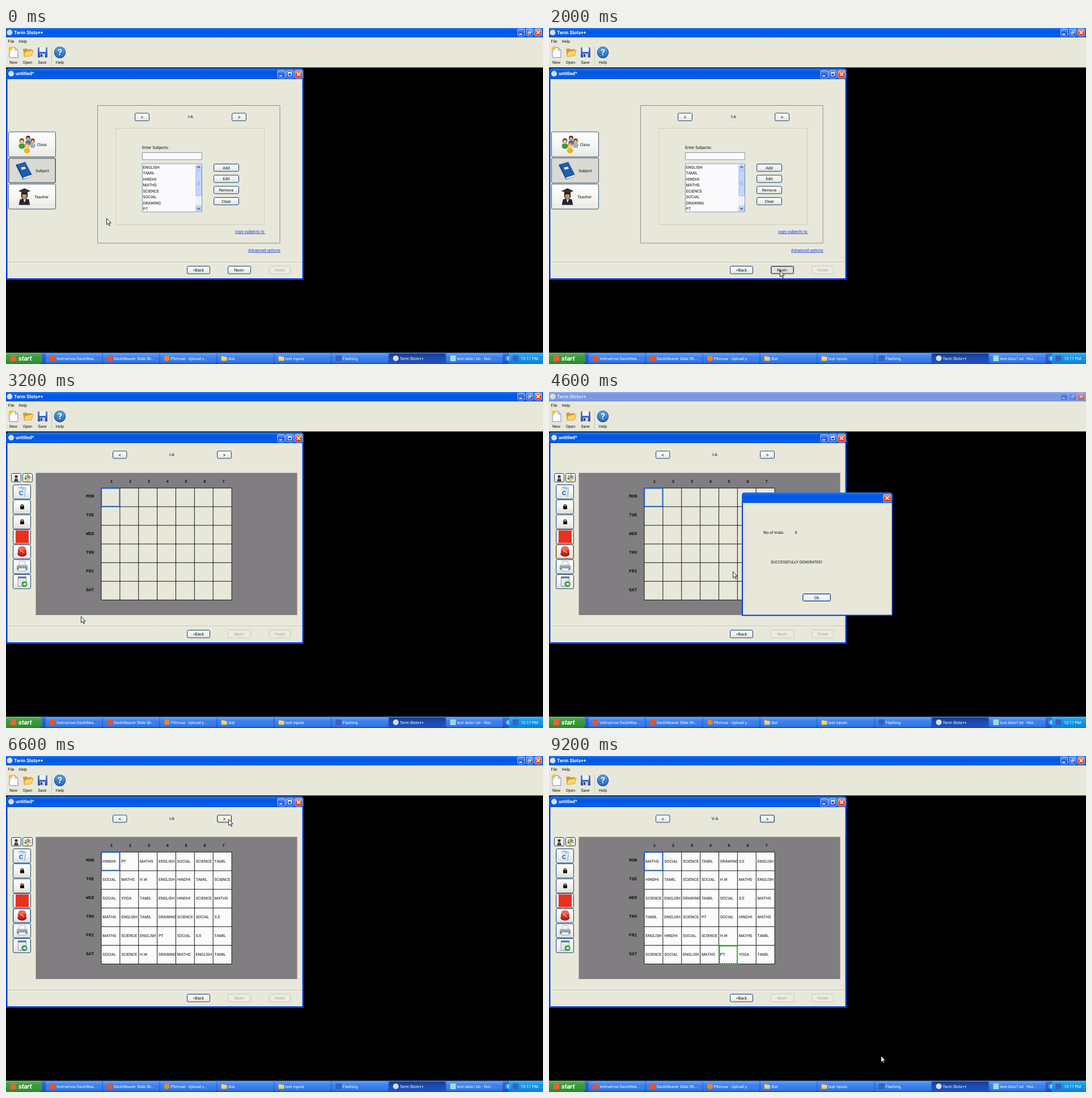
Animation, 947 px wide and 592 px high, one loop 9300 ms. Source, as an HTML page with a canvas:

```html
<!DOCTYPE html>
<html lang="en">
<head>
<meta charset="utf-8">
<title>Term Slots++</title>
<style>
html, body { margin: 0; width: 100%; height: 100%; overflow: hidden; background: #000; }
canvas { display: block; width: 947px; height: 592px; }
</style>
</head>
<body>
<canvas id="stage" width="947" height="592"></canvas>
<script>
const c = document.getElementById('stage').getContext('2d');
const LOOP = 9300, STEP = 100;
const BODY = '#e8e8da', SANS = 'Roboto, sans-serif', MONO = '"Liberation Mono", monospace';
const BLUE = ['#2a7cf2', '#0a5fe8', '#0055e2', '#0058ea', '#025ff2', '#0448c0'];
const DULL = ['#93b0ec', '#7c9ae4', '#7896e2', '#7a98e4', '#7e9ce8', '#6c88d4'];

// moments of the hard changes
const AT = { press: 1700, grid: 2400, dialog: 4200, filled: 5300, click: 6700, mark: 8500 };

const path = [
  [0, 177, 335], [300, 177, 335], [1500, 407, 427], [2500, 407, 427], [3200, 132, 395],
  [3700, 28, 284], [4200, 28, 284], [4600, 324, 316], [5000, 470, 364], [5300, 470, 364],
  [6300, 392, 111], [7500, 392, 111], [8000, 353, 202], [8500, 318, 352], [9000, 590, 515],
  [9200, 585, 528]
];

const subjects = {
  E: 'ENGLISH', T: 'TAMIL', H: 'HINDHI', M: 'MATHS', S: 'SCIENCE', O: 'SOCIAL',
  D: 'DRAWING', P: 'PT', W: 'H.W', Y: 'YOGA', X: 'S.E'
};
const first = 'HPMEOST OMWEHTS OYTEHSM METDSOX MSEPOXT OSWDMET'.split(' ');
const last = 'MOSTDXE HTSOWME SEDTOXM TESPOHM EHOSWMT SOEMPYT'.split(' ');
const days = 'MON TUE WED THU FRI SAT'.split(' ');
const classes = ['I-A', 'II-A', 'III-A', 'IV-A', 'V-A'];

function grad(y, h, cols) {
  const g = c.createLinearGradient(0, y, 0, y + h);
  cols.forEach((col, i) => g.addColorStop(i / (cols.length - 1), col));
  return g;
}
function box(x, y, w, h, fill, r = 0) {
  c.beginPath();
  c.roundRect(x, y, w, h, r);
  c.fillStyle = Array.isArray(fill) ? grad(y, h, fill) : fill;
  c.fill();
}
function frame(x, y, w, h, col, r = 0, lw = 1) {
  c.beginPath();
  c.roundRect(x + lw / 2, y + lw / 2, w - lw, h - lw, r);
  c.strokeStyle = col;
  c.lineWidth = lw;
  c.stroke();
}
function poly(pts, fill, edge, lw = 1) {
  c.beginPath();
  for (let i = 0; i < pts.length; i += 2) c.lineTo(pts[i], pts[i + 1]);
  c.closePath();
  if (fill) { c.fillStyle = fill; c.fill(); }
  if (edge) { c.strokeStyle = edge; c.lineWidth = lw; c.stroke(); }
}
function line(x1, y1, x2, y2, col, lw = 1) {
  c.beginPath();
  c.moveTo(x1, y1);
  c.lineTo(x2, y2);
  c.strokeStyle = col;
  c.lineWidth = lw;
  c.stroke();
}
function dot(x, y, rx, fill, ry = rx) {
  c.beginPath();
  c.ellipse(x, y, rx, ry, 0, 0, 7);
  c.fillStyle = fill;
  c.fill();
}
// y is the middle of the capitals
function text(s, x, y, col = '#111', size = 7.1, align = 'left', style = '', family = SANS) {
  c.font = `${style} ${size}px ${family}`;
  c.textAlign = align;
  c.fillStyle = col;
  c.fillText(s, x, y + size * .355);
}

function button(x, y, w, h, label, state) {
  const off = state === 'off';
  box(x, y, w, h, off ? '#ecebe0' : state === 'down' ? ['#dddcd4', '#e8e7de'] : ['#ffffff', '#f4f4ef', '#dfddd4'], 2);
  if (!off) frame(x + 1, y + 1, w - 2, h - 2, { hot: '#f3b44c', focus: '#8eaee6', down: '#8c8a84' }[state] || '#dbe4ee', 1);
  frame(x, y, w, h, off ? '#c9c7ba' : '#24486f', 2);
  const arrow = label === '<' || label === '>';
  if (label) text(label, x + w / 2, y + h / 2, off ? '#a5a396' : '#111', arrow ? 9 : 7.1, 'center');
}
function caption(x, y, s, kind) {
  box(x, y, s, s, kind === 'x' ? ['#f0987c', '#e0502c', '#c23a18'] : ['#6d9df5', '#2a62e0', '#2450cc'], 2);
  frame(x, y, s, s, '#b9cdf6', 2, .9);
  const m = s / 2, a = x + m, b = y + m;
  if (kind === 'x') {
    line(a - 3, b - 3, a + 3, b + 3, '#fff', 1.5);
    line(a + 3, b - 3, a - 3, b + 3, '#fff', 1.5);
  } else if (kind === '_') box(a - 3.5, b + 2, 5, 1.8, '#fff');
  else if (kind === 'o') {
    frame(a - 3.5, b - 3.5, 7, 7, '#fff');
    box(a - 3.5, b - 3.5, 7, 2, '#fff');
  } else {
    frame(a - 1, b - 3.5, 5, 4.5, '#d5e2ff');
    frame(a - 3.5, b - 1, 5, 4.5, '#fff');
  }
}
function appMark(x, y, r) { dot(x, y, r, '#d9dde0'); }

function person(x, y, k, shirt, hair, skin) {
  dot(x, y + 9 * k, 5.5 * k, shirt, 5 * k);
  dot(x, y, 4.2 * k, hair, 4.8 * k);
  dot(x, y + 1.5 * k, 3 * k, skin, 3.5 * k);
}
function people(x, y, k) {
  person(x + 2 * k, y - 10 * k, .9 * k, '#4a6f9e', '#3a2a22', '#d9a57c');
  person(x - 9 * k, y - 5 * k, k, '#3f9a38', '#6d3e20', '#efbf94');
  person(x + 10 * k, y - 5 * k, .9 * k, '#9fb0c8', '#4a3428', '#e8b48a');
  person(x, y + 3 * k, k, '#efb41e', '#d69a20', '#f4cda2');
}
function graduate(x, y, k) {
  poly([x - 10 * k, y + 16 * k, x - 8 * k, y + 6 * k, x, y + 4 * k, x + 8 * k, y + 6 * k, x + 10 * k, y + 16 * k], '#24262a');
  poly([x - 2 * k, y + 5 * k, x + 3 * k, y + 5 * k, x, y + 12 * k], '#e9e9e9');
  dot(x, y - k, 6 * k, '#1c1d20', 7 * k);
  dot(x, y, 4.3 * k, '#c98f66', 5.5 * k);
  box(x - 5.5 * k, y - 8 * k, 11 * k, 5 * k, '#1c1d20');
  poly([x - 11 * k, y - 9 * k, x, y - 14 * k, x + 11 * k, y - 9 * k, x, y - 5 * k], '#303236');
}

function toolbar(inactive) {
  box(0, 16, 947, 53.5, BODY);
  box(0, 0, 947, 16.5, inactive ? DULL : BLUE);
  appMark(6.5, 8, 5);
  text('Term Slots++', 14, 8, inactive ? '#dbe5fa' : '#fff', 8.6, 'left', 'bold');
  c.globalAlpha = inactive ? .6 : 1;
  caption(902, 1.5, 13, '_');
  caption(917, 1.5, 13, 'r');
  caption(932, 1.5, 13, 'x');
  c.globalAlpha = 1;
  text('File', 3.5, 23);
  text('Help', 22.5, 23);

  poly([6, 34, 16, 34, 21, 39, 21, 52, 6, 52], '#fbfcff', '#7b8ba2');
  poly([16, 34, 16, 39, 21, 39], '#cbd6e6', '#7b8ba2', .7);
  dot(8, 36, 3, '#f5c83c');
  line(4, 36, 13, 36, '#f3c02e');
  line(8, 32, 8, 42, '#f3c02e');
  poly([30, 37, 36, 36, 38, 38, 45, 37, 45, 49, 32, 50], '#d89a26');
  poly([33, 42, 48, 39, 45, 49, 32, 50.5], '#fbd56c', '#c98a20', .7);
  box(56, 34, 17, 18, ['#5b86dc', '#2a4ca8'], 1.5);
  box(59, 34, 11, 8, '#eef3fa');
  box(60, 45, 9, 7, '#c9d0dc');
  box(61, 46, 3, 5, '#2c4488');
  line(80.5, 34, 80.5, 66, '#c8c7b6');
  dot(95, 43, 10.3, '#1c4f98');
  dot(95, 42.7, 9.3, grad(33, 20, ['#5ba4ea', '#1f66bd']));
  text('?', 95, 43, '#fff', 15, 'center', 'bold');
  [['New', 13], ['Open', 38], ['Save', 64], ['Help', 95]].forEach(([s, x]) => text(s, x, 60.5, '#111', 7.1, 'center'));
}

function innerWindow() {
  box(0, 71, 525, 373, '#0a38da', [5, 5, 0, 0]);
  box(0, 71, 525, 19.5, BLUE, [5, 5, 0, 0]);
  box(2.5, 90, 520, 351, BODY);
  appMark(9, 80.5, 5);
  text('untitled*', 17, 80.5, '#fff', 8.4, 'left', 'bold');
  caption(478.5, 74.5, 14, '_');
  caption(493.5, 74.5, 14, 'o');
  caption(509, 74.5, 14, 'x');
  line(3, 412.5, 522, 412.5, '#c3c2b1');
  line(3, 413.5, 522, 413.5, '#f6f6ee');
  button(319, 419, 41, 14.5, '<Back');
}

function scrollArrow(y, up) {
  box(334.5, y, 10.5, 11, ['#dbe5fe', '#b7caf8'], 1.5);
  frame(334.5, y, 10.5, 11, '#a5b9e8', 1.5, .7);
  const d = up ? -1.5 : 1.5, m = y + 5.5;
  c.beginPath();
  c.moveTo(337, m - d);
  c.lineTo(339.7, m + d);
  c.lineTo(342.4, m - d);
  c.strokeStyle = '#40587f';
  c.lineWidth = 1.5;
  c.stroke();
}
function link(s, x, y, w) {
  text(s, x, y, '#1d35d8');
  line(x, y + 4.5, x + w, y + 4.5, '#3a50dc', 1);
}

function subjectPage(t) {
  const pressed = t >= AT.press;
  button(391, 419, 41, 14.5, 'Next>', pressed ? 'down' : '');
  button(464, 419, 38, 14.5, 'Finish', 'off');

  ['Class', 'Subject', 'Teacher'].forEach((s, i) => {
    const y = 182.5 + i * 46, chosen = i === 1;
    box(4, y, 84, 45, chosen ? '#dadad2' : ['#ffffff', '#f6f6f3', '#eae9e3'], 2);
    if (chosen && !pressed) frame(5, y + 1, 82, 43, '#8a8c8c', 1);
    frame(4, y, 84, 45, chosen ? '#4a5a6c' : '#355477', 2);
    text(s, 54.5 - i * 2.3, y + 22.5);
  });
  people(37, 204, 1);
  poly([17, 241, 34, 236, 47, 261, 30, 267], '#123f80');
  poly([19, 240.5, 34, 236.5, 45, 258, 30, 263], '#1f5cae');
  poly([30, 263.5, 45.5, 258.5, 47, 261, 30.5, 266], '#eef2f6');
  poly([26, 246, 33, 244, 35, 248, 28, 250], '#dbe7f4');
  graduate(32.5, 296, .98);

  frame(161, 136, 322.5, 243.5, '#8c8c84');
  frame(193, 176, 263, 171, '#cfcfc1');
  button(227, 149.5, 26, 14.5, '<');
  button(398, 149.5, 26, 14.5, '>');
  text('I-A', 325.5, 156, '#111', 7.6, 'center');
  text('Enter Subjects:', 240, 210.5);
  box(240, 219, 106, 13.5, '#faf9fc');
  frame(240, 219, 106, 13.5, '#7f96b4');
  box(240, 238.5, 106, 86, '#faf9fc');
  frame(240, 238.5, 106, 86, '#7f96b4');
  [...'ETHMSODP'].forEach((k, i) => text(subjects[k], 241.5, 245 + i * 10.5));
  box(334, 239.5, 11, 84, '#eff0f4');
  scrollArrow(239.5, true);
  scrollArrow(312.5, false);
  box(334.5, 251, 10.5, 45, '#c5d5fb', 1.5);
  frame(334.5, 251, 10.5, 45, '#9db4e6', 1.5, .8);
  for (let i = 0; i < 4; i++) line(337, 270.5 + i * 2, 342, 270.5 + i * 2, '#94add8', .8);
  ['Add', 'Edit', 'Remove', 'Clear'].forEach((s, i) => button(366, 239 + i * 19.7, 45, 14, s));
  link('copy subjects to', 404, 358, 53);
  link('Advanced options', 427, 391, 57);
}

function padlock(y) {
  c.beginPath();
  c.arc(28.5, y - 1, 2.3, Math.PI, 0);
  c.strokeStyle = '#111';
  c.lineWidth = 1.3;
  c.stroke();
  box(25, y - 1, 7, 5.5, '#111', .5);
}
function sideIcons(t) {
  button(9, 143, 18, 16);
  button(29, 143, 18, 16);
  graduate(18, 151.5, .36);
  people(38, 151, .38);
  for (let i = 0; i < 7; i++) {
    const hot = i === 4 && t >= 3600 && t < AT.filled;
    const focus = i === 4 && t >= AT.filled && t < AT.click;
    button(12, 163 + i * 26.35, 32, 26, '', hot ? 'hot' : focus ? 'focus' : '');
  }
  poly([21, 168, 36, 170, 33.5, 186, 24, 186], '#dde9f3');
  poly([21, 168, 27, 166, 37, 169, 31, 172], '#a9c4dc');
  line(34.5, 172, 32.5, 185, '#9db8d2', 1.5);
  c.beginPath();
  c.arc(27, 178, 3, .6, 5.6);
  c.strokeStyle = '#2c78cc';
  c.lineWidth = 1.7;
  c.stroke();
  padlock(202);
  padlock(228.5);
  box(17, 244, 23, 22, '#e8321e');
  dot(28.3, 285, 8, '#9c1a18', 5);
  box(20.8, 274, 15, 13, ['#e8442f', '#c42220'], 6);
  dot(28.3, 275.5, 6.5, '#ee6a58', 3.8);
  line(25, 279, 31.5, 283, '#fbd6cc', 1.4);
  box(23, 298, 11, 8, '#fff');
  frame(23, 298, 11, 8, '#95a2b0', 0, .8);
  box(19, 304.5, 19, 9, ['#b4bec9', '#6f7b8a'], 2);
  box(22, 310, 13, 6, '#f6f8fb');
  frame(22, 310, 13, 6, '#8a96a4', 0, .8);
  box(21, 325, 15, 18, '#f4f7f4');
  frame(21, 325, 15, 18, '#71838f', 0, .9);
  box(21, 325, 15, 3.5, '#5d7f9c');
  for (let i = 0; i < 4; i++) line(23, 331.5 + i * 3, 34, 331.5 + i * 3, '#b5c0c8', .8);
  dot(32.5, 338.5, 5, '#2f9a36');
  poly([30, 337.5, 32.5, 337.5, 32.5, 335.5, 36, 338.5, 32.5, 341.5, 32.5, 339.5, 30, 339.5], '#fff');
}

function rowsOf(k) {
  if (k === 4) return last;
  return first.map((_, r) => {
    const s = first[(r + k) % 6], n = k * 2;
    return s.slice(n) + s.slice(0, n);
  });
}
function gridPage(t) {
  const k = t < AT.click ? 0 : Math.min(4, 1 + Math.floor((t - AT.click) / 200));
  const full = t >= AT.filled, rows = rowsOf(k), u = 32.87, x0 = 168, y0 = 169.2;
  button(391, 419, 41, 14.5, 'Next>', 'off');
  button(464, 419, 38, 14.5, 'Finish', 'off');
  button(188, 103.5, 25.5, 14, '<');
  button(372, 103.5, 26, 14, '>', t >= 6200 && t < 7600 ? 'hot' : t >= 7600 ? 'focus' : '');
  text(classes[k], 292.5, 110, '#111', 7.6, 'center');
  sideIcons(t);

  box(52.5, 142.5, 461, 250.5, '#807e80');
  box(x0, y0, u * 7, u * 6, full ? '#fbfafc' : BODY);
  for (let r = 0; r < 6; r++) {
    text(days[r], 141, 183.3 + r * 32.9, '#111', 8, 'left', 'bold', MONO);
    for (let i = 0; full && i < 7; i++) {
      const x = x0 + i * u, y = y0 + r * u;
      c.save();
      c.beginPath();
      c.rect(x, y, u, u);
      c.clip();
      text(subjects[rows[r][i]], x + 2.3, y + 15.9, '#111', 7);
      c.restore();
    }
  }
  for (let i = 0; i < 8; i++) {
    const x = x0 + i * u, y = y0 + i * u;
    line(x, y0, x, y0 + u * 6, '#161616');
    if (i < 7) {
      line(x0, y, x0 + u * 7, y, '#161616');
      text(i + 1, 186 + i * 32.9, 157, '#111', 7.5, 'center', 'bold', MONO);
    }
  }
  frame(167.6, 168.8, 33.5, 33.5, '#1c62cf', 0, 1.6);
  if (t >= AT.mark) {
    frame(299.5, 333.5, 33.5, 33.5, '#8fd98a', 0, 2);
    c.setLineDash([3, 1]);
    frame(299.5, 333.5, 33.5, 33.5, '#1fa51f', 0, 2);
    c.setLineDash([]);
  }
}

function dialog() {
  box(340, 177, 266, 217.5, '#0a34cf', [5, 5, 0, 0]);
  box(340, 177, 266, 19, BLUE, [5, 5, 0, 0]);
  box(342, 195.5, 262.5, 197, BODY);
  caption(589.5, 180, 14, 'x');
  text('No.of trials:', 378, 247.5);
  text('0', 433.5, 247.5);
  text('SUCCESSFULLY GENDRATED!', 391, 299.5, '#111', 6.9);
  button(447, 355, 50, 14, 'Ok', 'focus');
}

const tasks = [
  ['Velmarrow DeckWea...', '#d8593a'], ['DeckWeaver Slide Sh...', '#d8593a'],
  ['Plimvue - Upload y...', '#e8862c', 1], ['dist', 0], ['test inputs', 0],
  ['Flashing', '#3560c8'], ['Term Slots++', '#d9dde0', 1], ['test data1.txt - Not...', '#a8d4e6']
];
function taskbar() {
  box(0, 572, 947, 20, ['#4a8cf4', '#2a66e0', '#245cdb', '#2359d4', '#1c46ac']);
  box(0, 572, 64, 20, ['#6ab565', '#3f9a3d', '#389638', '#2f8530'], [0, 7, 7, 0]);
  box(8, 577, 10, 10, '#e8633a');
  text('start', 22, 582, '#fff', 11.4, 'left', 'italic bold');
  tasks.forEach(([s, col, round], i) => {
    const x = 70 + i * 100.9, on = i === 6;
    box(x, 573.5, 99.5, 17, on ? ['#173a94', '#1e4bb4', '#2050bc'] : ['#66a2fa', '#3c82f2', '#3a7bea', '#3270dd'], 2);
    if (!col) {
      box(x + 7, 578, 5, 3, '#e2b23c', 1);
      box(x + 7, 579.5, 10, 7, ['#fbe38a', '#e8bc48'], 1);
    } else if (round) dot(x + 12, 582, 5, col);
    else box(x + 7, 577, 10, 10, col);
    text(s, x + 19, 582, '#fff', 7.1);
  });
  box(886, 572, 61, 20, ['#3fb4f6', '#1a98ea', '#128ee4', '#0f7cd0']);
  line(886, 572, 886, 592, '#1266b8');
  dot(885.5, 582, 5, '#3a8ef0');
  c.beginPath();
  c.moveTo(887, 579);
  c.lineTo(884, 582);
  c.lineTo(887, 585);
  c.strokeStyle = '#fff';
  c.lineWidth = 1.3;
  c.stroke();
  box(893.5, 577, 10, 10, '#3560c8');
  text('12:17 PM', 908, 582, '#fff', 7.1);
}

function cursor(t) {
  let i = path.length - 1;
  while (path[i][0] > t) i--;
  const [ta, xa, ya] = path[i], [tb, xb, yb] = path[i + 1] || [LOOP, xa, ya];
  const p = (t - ta) / (tb - ta), e = p * p * (3 - 2 * p);
  c.save();
  c.translate(xa + (xb - xa) * e + .5, ya + (yb - ya) * e + .5);
  poly([0, 0, 0, 11, 2.6, 8.7, 4.4, 12.8, 6, 12, 4.3, 8, 7.6, 8], '#fff', '#111', .9);
  c.restore();
}

function draw(t) {
  const modal = t >= AT.dialog && t < AT.filled;
  box(0, 0, 947, 592, '#000');
  toolbar(modal);
  innerWindow();
  if (t < AT.grid) subjectPage(t);
  else gridPage(t);
  if (modal) dialog();
  taskbar();
  cursor(t);
}

c.textRendering = 'geometricPrecision';
let shown = -1;
const start = performance.now();
function tick() {
  const t = Math.floor((performance.now() - start) % LOOP / STEP) * STEP;
  if (t !== shown) draw(shown = t);
  requestAnimationFrame(tick);
}
tick();
</script>
</body>
</html>
```
